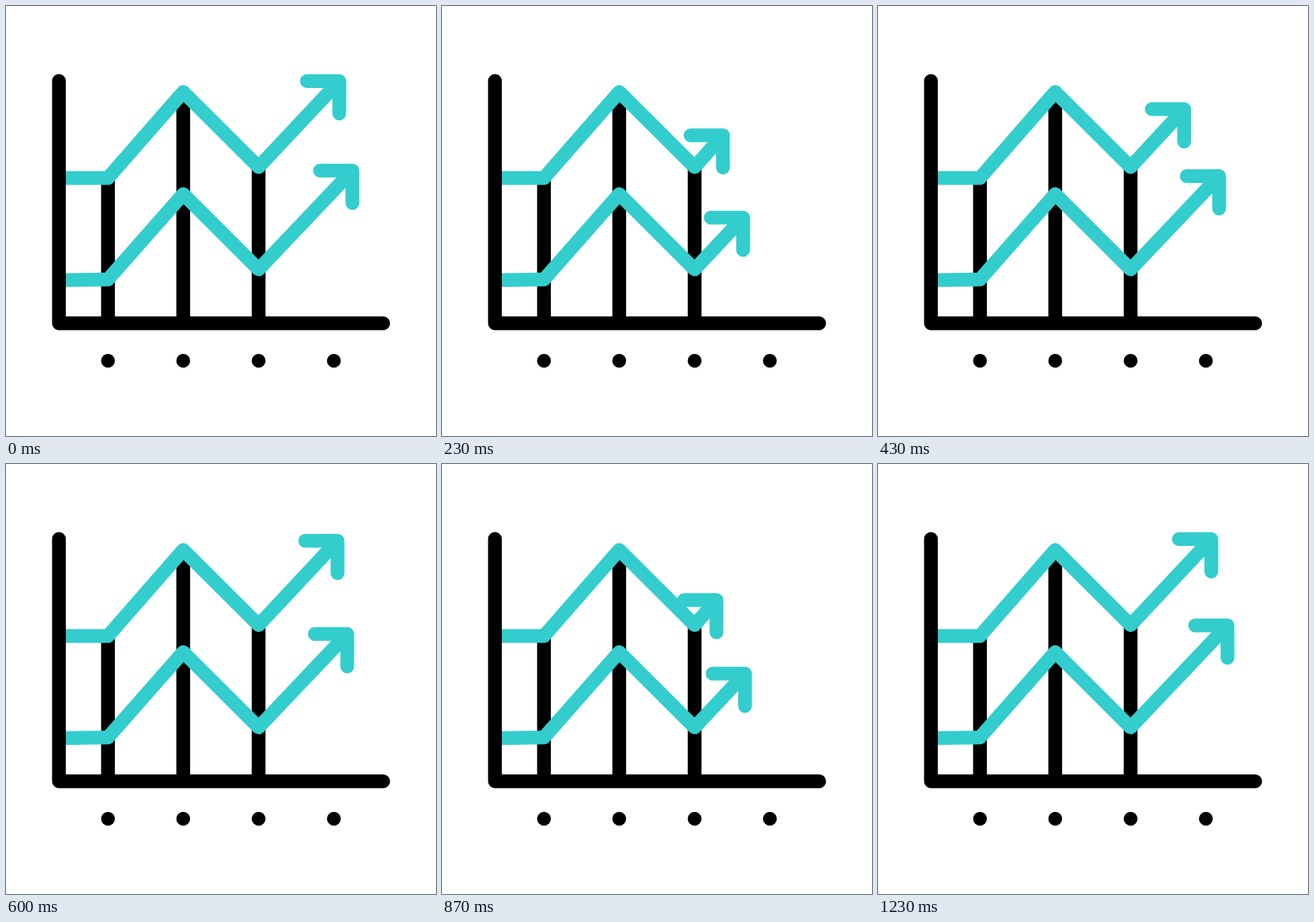
Write an HTML page that moves like this. It is 640 px wide and 640 px high and loops after 1.67 s.

```html
<!DOCTYPE html>
<html lang="en">
<head>
<meta charset="utf-8">
<title>Growth chart</title>
<style>
  html, body { margin: 0; width: 100%; height: 100%; overflow: hidden; background: #fff; }
  svg { display: block; width: 100vw; height: 100vh; }
  path { fill: none; stroke-width: 20.5; stroke-linejoin: round; }
  .ink { stroke: #000; }
  .trend { stroke: #33cdcd; }
  .round { stroke-linecap: round; }
</style>
</head>
<body>
<svg viewBox="0 0 640 640">
  <path class="ink" d="M151.8 256V472M263.8 130V472M376 240V472"/>
  <path class="trend round" id="upper"/>
  <path class="trend round" id="lower"/>
  <path class="ink round" d="M78.8 111.6V472.2H561.4"/>
  <g>
    <circle cx="151.8" cy="528" r="10.3"/>
    <circle cx="263.8" cy="528" r="10.3"/>
    <circle cx="376" cy="528" r="10.3"/>
    <circle cx="488" cy="528" r="10.3"/>
  </g>
</svg>
<script>
const LOOP = 1670, FPS = 30, LAST = 37, HEAD = 48.2, SLOPE = 1.037;

// keys: [step, distance pulled back from the far end]
const trends = [
  {
    el: document.getElementById('upper'),
    base: 'M84 256H151.8L263.8 128L376 239.8',
    tip: [496, 111.7],
    keys: [[0, 0], [8.65, 86], [17, 0], [27, 90], [37, 0]]
  },
  {
    el: document.getElementById('lower'),
    base: 'M84 408L151.8 407L263.8 280L376 392',
    tip: [520.2, 240.2],
    keys: [[-1.2, 0], [6.6, 72.5], [15.3, 0], [25.4, 70], [35.2, 0]]
  }
];

const ease = u => u * u * (3 - 2 * u);

function valueAt(keys, step) {
  const i = keys.findIndex(k => k[0] > step);
  if (i < 0) return keys[keys.length - 1][1];
  const [s0, v0] = keys[i - 1], [s1, v1] = keys[i];
  return v0 + (v1 - v0) * ease((step - s0) / (s1 - s0));
}

function draw(ms) {
  const step = Math.min(LAST, Math.floor((ms + 4) * FPS / 1000));
  for (const { el, base, tip, keys } of trends) {
    const back = valueAt(keys, step);
    const x = tip[0] - back, y = tip[1] + back * SLOPE;
    el.setAttribute('d', `${base}L${x} ${y}M${x - HEAD} ${y}H${x}V${y + HEAD}`);
  }
}

const start = performance.now();
function tick() {
  draw((performance.now() - start) % LOOP);
  requestAnimationFrame(tick);
}
tick();
</script>
</body>
</html>
```
